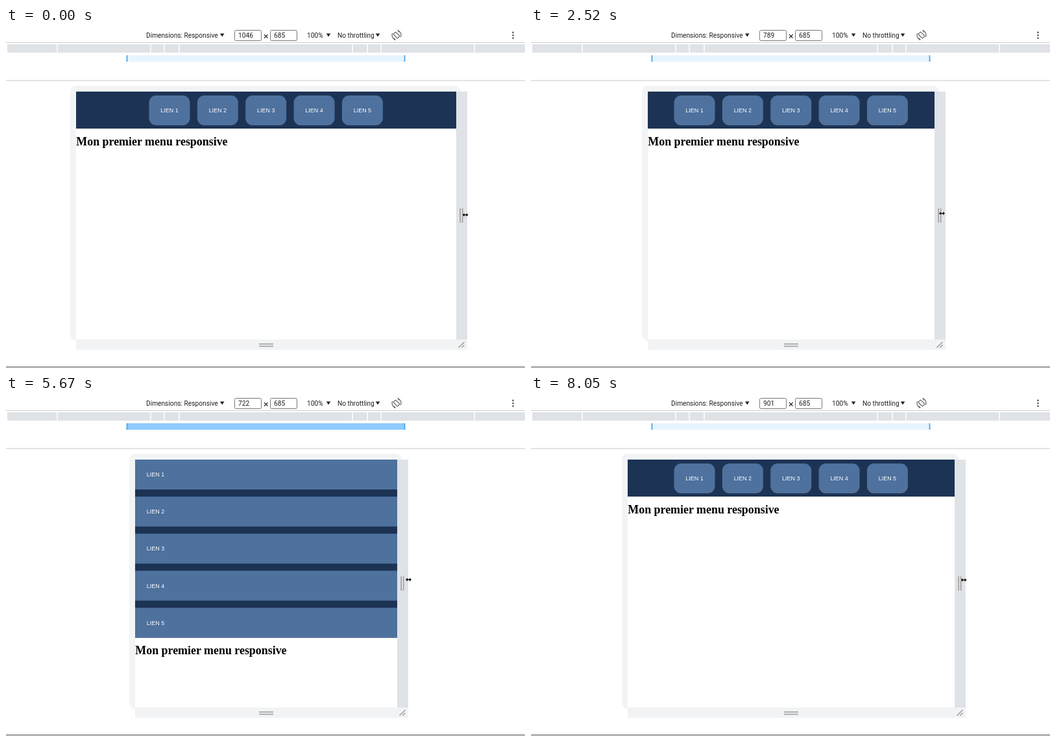
Animation of 800 by 524 pixels, one loop 8.12 s. Source, as an HTML page:

```html
<!DOCTYPE html>
<html lang="fr">
<head>
<meta charset="utf-8">
<title>Menu responsive</title>
<style>
  html, body { margin: 0; width: 100%; height: 100%; overflow: hidden; background: #fff; }
  svg { display: block; width: 800px; height: 524px; }
  .ui { font: 10.2px Roboto, "Liberation Sans", Arial, sans-serif; fill: #1f1f1f; }
  .link { font: 8.96px "Liberation Sans", Arial, sans-serif; fill: #fff; }
  .title { font: bold 17.92px "Liberation Serif", "Times New Roman", serif; fill: #000; }
  .grip { stroke: #9b9b9b; stroke-width: 1.5; fill: none; }
  .field { fill: #fff; stroke: #777; }
  .icon { fill: none; stroke: #5f6368; stroke-width: 1.2; }
</style>
</head>
<body>
<svg viewBox="0 0 800 524" xmlns="http://www.w3.org/2000/svg">
  <rect width="800" height="524" fill="#fff"/>

  <g id="toolbar">
    <text class="ui" x="216" y="15">Dimensions: Responsive</text>
    <rect class="field" x="352.5" y="3.5" width="41" height="16" rx="2"/>
    <text class="ui" id="size" x="358" y="15">1046</text>
    <path d="M398 10l5.5 5.5M403.500 10l-5.500 5.500" stroke="#222" stroke-width="1.100"/>
    <rect class="field" x="407.5" y="3.5" width="41" height="16" rx="2"/>
    <text class="ui" x="413" y="15">685</text>
    <text class="ui" x="464" y="15">100%</text>
    <text class="ui" x="511" y="15">No throttling</text>
    <path d="M330 8.500h6.500l-3.250 5zM493.800 8.500h6.500l-3.250 5zM569.800 8.500h6.500l-3.250 5z" fill="#222"/>
    <g class="icon" transform="translate(602 11)">
      <rect x="-2.600" y="-4.600" width="5.200" height="9.200" rx="1" transform="rotate(-45)"/>
      <path d="M-2 6.800A7 7 0 0 1 -6.300 -3M2 -6.800A7 7 0 0 1 6.300 3M-4.300 4.800L-2 6.800L-4 7.200M4.300 -4.800L2 -6.800L4 -7.200"/>
    </g>
    <g fill="#5f6368">
      <circle cx="781.5" cy="7" r="1.4"/><circle cx="781.5" cy="11.300" r="1.4"/><circle cx="781.5" cy="15.600" r="1.4"/>
    </g>
    <rect y="22" width="800" height="1" fill="#cbcbcb"/>
  </g>

  <g id="ruler">
    <rect x="2" y="25" width="798" height="13" fill="#dfe2e6"/>
    <rect id="query" x="186" y="42" width="429" height="10"/>
    <path d="M186.500 42v10M614.500 42v10" stroke="#4ba5ea" stroke-width="1.800"/>
    <rect y="80.500" width="800" height="1" fill="#c9c9c9"/>
  </g>

  <rect id="bezel" y="89" height="393" rx="9" fill="#f2f4f5"/>
  <rect id="foot" y="480" height="16" fill="#f1f3f4"/>
  <rect id="page" y="98" height="382" fill="#fff"/>
  <rect id="nav" y="98" fill="#1d3354"/>
  <g id="row"></g>
  <g id="stack"></g>
  <text class="title" id="title">Mon premier menu responsive</text>

  <path class="grip" d="M390 487h22M390 490.500h22"/>
  <g id="side">
    <rect y="98" width="17" height="382" fill="#dfe2e7"/>
    <path class="grip" d="M6.200 278v22M9.700 278v22"/>
    <path class="grip" d="M3.500 492.500l9 -8.500M8.500 492.500l4 -4"/>
  </g>
  <path id="cursor" d="M-4.500 0l3 -2.700v2h3v-2l3 2.700l-3 2.700v-2h-3v2z"
    fill="#000" stroke="#fff" stroke-width="1" paint-order="stroke"/>
  <rect y="521" width="800" height="3" fill="#b3b3b3"/>
</svg>

<script>
const LOOP = 8120, STEP = 70, CENTER = 401, ZOOM = 0.56, BREAKPOINT = 768;

// time, viewport width, cursor offset from the page edge, cursor y
const KEYS = [
  [490, 1046, 14, 288],
  [1610, 898, 11, 286.5],
  [3290, 713, 12, 285],
  [4270, 650, 13, 284],
  [4550, 651, 14, 284],
  [5670, 722, 17.5, 283],
  [6650, 808, 14, 284],
  [8050, 901, 14, 283.5]
];

const $ = id => document.getElementById(id);

function add(parent, tag, attrs, text) {
  const el = document.createElementNS("http://www.w3.org/2000/svg", tag);
  set(el, attrs);
  if (text) el.textContent = text;
  parent.appendChild(el);
  return el;
}

function set(el, attrs) {
  for (const name in attrs) el.setAttribute(name, attrs[name]);
}

for (const x of [79, 223, 244, 267, 534, 557, 578, 722]) {
  add($("ruler"), "rect", { x: x - 0.75, y: 24, width: 1.5, height: 14, fill: "#fff" });
}

const bars = [];
for (let i = 0; i < 5; i++) {
  const x = 220.5 + i * 74.35, y = 98 + i * 57.1, label = "LIEN " + (i + 1);
  add($("row"), "rect", { x, y: 104, width: 63, height: 46, rx: 11, fill: "#4e719e" });
  add($("row"), "text", { class: "link", x: x + 17.8, y: 130 }, label);
  bars.push(add($("stack"), "rect", { y, height: 46.1, fill: "#4e719e" }));
  add($("stack"), "text", { class: "link", x: 17.8, y: y + 26.2 }, label);
}

// Slope at a key: zero at the ends and at turning points
function slope(i) {
  if (i === 0 || i === KEYS.length - 1) return 0;
  const [a, b, c] = [KEYS[i - 1], KEYS[i], KEYS[i + 1]];
  const before = (b[1] - a[1]) / (b[0] - a[0]);
  const after = (c[1] - b[1]) / (c[0] - b[0]);
  return before * after <= 0 ? 0 : 2 * before * after / (before + after);
}

function pose(t) {
  const time = Math.max(t, KEYS[0][0]);
  let i = 0;
  while (i < KEYS.length - 2 && time >= KEYS[i + 1][0]) i++;
  const a = KEYS[i], b = KEYS[i + 1], span = b[0] - a[0];
  const u = Math.min(1, (time - a[0]) / span), v = 1 - u;
  const mix = k => a[k] * v + b[k] * u;
  const width = v * v * (1 + 2 * u) * a[1] + u * u * (3 - 2 * u) * b[1]
    + span * u * v * (v * slope(i) - u * slope(i + 1));
  return { width, dx: mix(2), y: mix(3) };
}

function draw(t) {
  const { width, dx, y } = pose(Math.floor(t / STEP) * STEP);
  const left = Math.round(CENTER - width * ZOOM / 2);
  const right = Math.round(CENTER + width * ZOOM / 2);
  const w = right - left, narrow = width <= BREAKPOINT;
  const navHeight = narrow ? 274.5 : 57;

  $("size").textContent = Math.round(width);
  set($("query"), { fill: narrow ? "#90caff" : "#e7f5fe" });
  set($("bezel"), { x: left - 9, width: w + 16 });
  set($("foot"), { x: left, width: w + 17 });
  set($("page"), { x: left, width: w });
  set($("nav"), { x: left, width: w, height: navHeight });
  set($("row"), { display: narrow ? "none" : "inline" });
  set($("stack"), { display: narrow ? "inline" : "none", transform: `translate(${left} 0)` });
  bars.forEach(bar => set(bar, { width: w }));
  set($("title"), { x: left + 0.3, y: 98 + navHeight + 25.5 });
  set($("side"), { transform: `translate(${right} 0)` });
  set($("cursor"), { transform: `translate(${right + dx} ${y})` });
}

const start = performance.now();
function tick() {
  draw((performance.now() - start) % LOOP);
  requestAnimationFrame(tick);
}
tick();
</script>
</body>
</html>
```
